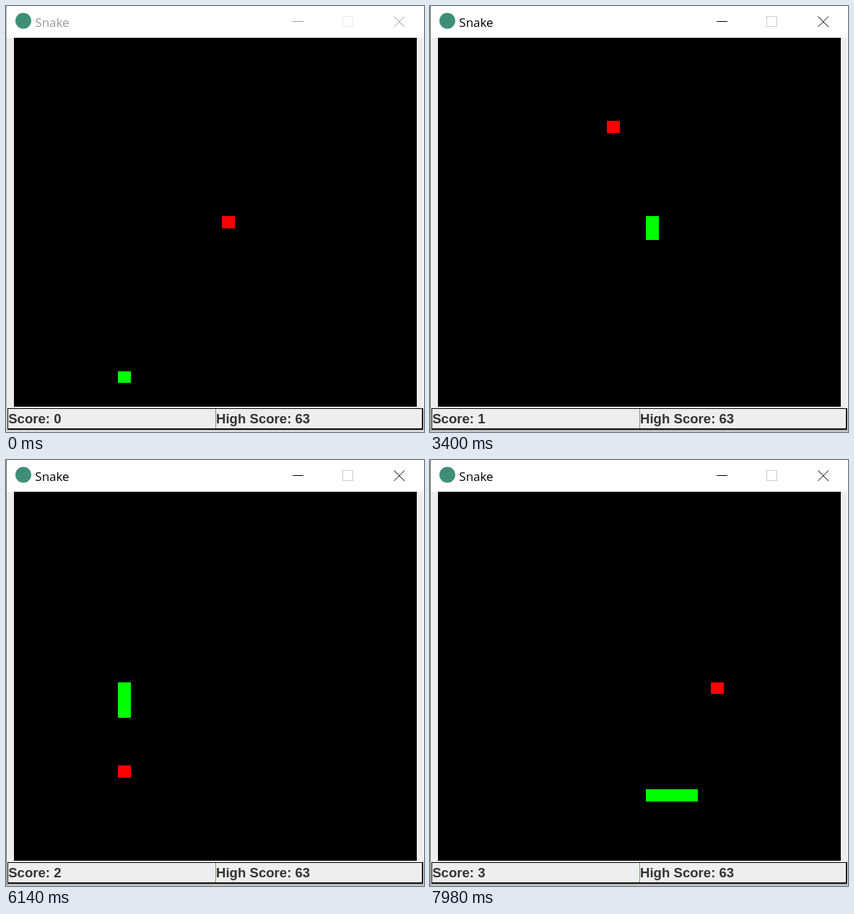
Write an HTML page that moves like this. It is 579 by 590 pixels and loops after 8 s.

```html
<!DOCTYPE html>
<html lang="en">
<head>
<meta charset="utf-8">
<title>Snake</title>
<style>
  html, body { margin: 0; width: 100%; height: 100%; overflow: hidden; background: #fff; }
  svg { display: block; width: 579px; height: 590px; }
  .title { font: 17px "Open Sans", "Noto Sans", sans-serif; }
  .label { font: bold 18.6px "Liberation Sans", Arial, sans-serif; fill: #333; }
</style>
</head>
<body>
<svg viewBox="0 0 579 590" xmlns="http://www.w3.org/2000/svg">
  <rect width="579" height="590" fill="#fff"/>
  <rect x="1" y="44" width="577" height="544" fill="#eee"/>
  <path id="frame" d="M.5 0V589M0 588.5H579" fill="none"/>

  <circle cx="24" cy="20.5" r="11" fill="#3f8f77"/>
  <text id="title" class="title" x="40.3" y="29">Snake</text>
  <g fill="none">
    <path id="buttons" d="M397 21.5H412M537.5 14.5L552 29M552 14.5L537.5 29"/>
    <rect id="maximize" x="466.5" y="14.5" width="14" height="14"/>
  </g>

  <rect x="11" y="44" width="558" height="511" fill="#000"/>
  <g shape-rendering="crispEdges">
    <path id="apple" fill="#f00"/>
    <path id="snake" fill="#0f0"/>
  </g>

  <path d="M2 557H578V587H2ZM3 558V585H576V558Z" fill="#000" fill-rule="evenodd"/>
  <rect x="290" y="558" width="1" height="27" fill="#6fa06f"/>
  <text id="score" class="label" x="3.2" y="578"></text>
  <text class="label" x="291" y="578">High Score: 63</text>
</svg>
<script>
const LOOP = 8000;
const FOCUS = 650;
const START = [8, 28];
const MOVES = [["R", 8], ["U", 21], ["L", 8], ["D", 18], ["R", 11]];
const APPLES = [[16, 15], [13, 7], [8, 23], [21, 16]];
const DIRS = { R: [1, 0], L: [-1, 0], U: [0, -1], D: [0, 1] };
// Screen ticks paired with their time in ms; moves land on ticks.
const CLOCK = [[0, 1330], [13, 2150], [26, 2960], [39, 3790], [52, 4610],
  [65, 5430], [78, 6260], [92, 7160], [105, 7980]];

const el = id => document.getElementById(id);
const frame = el("frame"), title = el("title"), buttons = el("buttons"),
  maximize = el("maximize"), apple = el("apple"), snake = el("snake"), score = el("score");

const rowY = r => Math.floor(44 + 16.5 * r);
const cell = ([c, r]) => `M${11 + 18 * c} ${rowY(r)}h18V${rowY(r + 1)}h-18Z`;

function tickTime(n) {
  let i = 1;
  while (i < CLOCK.length - 1 && n > CLOCK[i][0]) i++;
  const [n0, t0] = CLOCK[i - 1], [n1, t1] = CLOCK[i];
  return Math.floor((t0 + (t1 - t0) * (n - n0) / (n1 - n0)) / 10) * 10;
}

const moveTime = k => tickTime(Math.floor(0.82 + 1.61 * k));

// Play the whole game once, keeping the state after every move.
function play() {
  let head = START, eaten = 0, body = [head];
  const states = [{ time: 0, body, eaten }];
  for (const [dir, count] of MOVES) {
    const [dx, dy] = DIRS[dir];
    for (let i = 0; i < count; i++) {
      head = [head[0] + dx, head[1] + dy];
      const [ax, ay] = APPLES[eaten];
      if (head[0] === ax && head[1] === ay) eaten++;
      body = [head, ...body].slice(0, eaten + 1);
      states.push({ time: moveTime(states.length - 1), body, eaten });
    }
  }
  return states;
}

const states = play();

function draw(t) {
  const active = t >= FOCUS;
  frame.setAttribute("stroke", active ? "#707070" : "#aaa");
  title.setAttribute("fill", active ? "#000" : "#999");
  buttons.setAttribute("stroke", active ? "#000" : "#999");
  maximize.setAttribute("stroke", active ? "#ccc" : "#ebebeb");

  const { body, eaten } = states.findLast(s => s.time <= t);
  snake.setAttribute("d", body.map(cell).join(""));
  apple.setAttribute("d", cell(APPLES[eaten]));
  score.textContent = "Score: " + eaten;
}

const begin = performance.now();
function tick() {
  draw((performance.now() - begin) % LOOP);
  requestAnimationFrame(tick);
}
tick();
</script>
</body>
</html>
```
